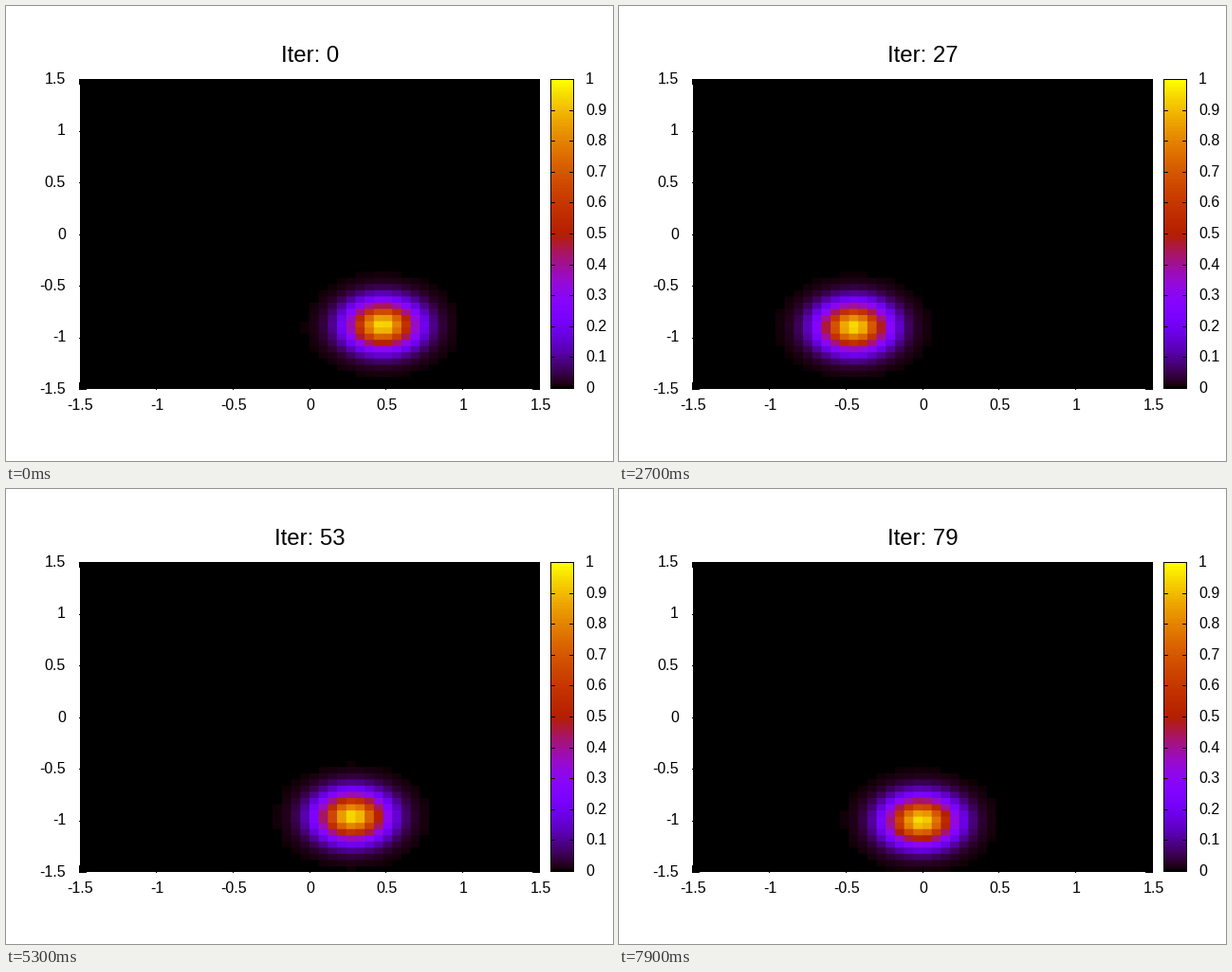
Animation, 640 px wide and 480 px high, one loop 8 s. Source, as a matplotlib script:

```python
import numpy as np
import matplotlib.pyplot as plt
from matplotlib.animation import FuncAnimation
from matplotlib.patches import Rectangle

W, H, DPI = 640, 480, 100
FRAMES, STEP = 80, 0.1
CELLS, SIGMA, CUTOFF = 50, 0.15, 0.00363
LEFT, RIGHT, TOP, BOTTOM = 78, 563, 77, 404      # heat map pixels
X0, X1, Y0, Y1 = 77.8, 562.2, 77.5, 404.5        # data range -1.5 .. 1.5

plt.rcParams["font.family"] = "Liberation Sans"


def palette(v):
    """Black-violet-red-yellow colour ramp."""
    v = np.clip(v, 0, 1)
    rgb = [np.sqrt(v), v ** 3, np.clip(np.sin(2 * np.pi * v), 0, 1)]
    return np.stack(rgb, axis=-1)


def swing(count):
    """Angles of a unit pendulum released at 0.5 rad, by RK4."""
    def slope(s):
        return np.array([s[1], -np.sin(s[0])])

    state, angles = np.array([0.5, 0.0]), []
    for _ in range(count):
        a = slope(state)
        b = slope(state + a * STEP / 2)
        c = slope(state + b * STEP / 2)
        d = slope(state + c * STEP)
        state = state + STEP / 6 * (a + 2 * b + 2 * c + d)
        angles.append(state[0])
    return angles


def coverage(first, last, lo, hi):
    """Share of every pixel that each cell covers along one axis."""
    edges = np.linspace(lo, hi, CELLS + 1)
    p = np.arange(first, last)[:, None]
    share = np.minimum(edges[1:], p + 1) - np.maximum(edges[:-1], p)
    return np.clip(share, 0, None)


COLS = coverage(LEFT, RIGHT, X0, X1)
ROWS = coverage(TOP, BOTTOM, Y0, Y1)
GRID = np.linspace(-1.5, 1.5, CELLS + 1)
ANGLES = swing(FRAMES)


def bump(centre):
    g = np.exp(-(GRID - centre) ** 2 / (2 * SIGMA ** 2))
    return (g[1:] + g[:-1]) / 2


def heat(n):
    x, y = np.sin(ANGLES[n]) - 0.0004, -np.cos(ANGLES[n])
    v = np.outer(bump(y)[::-1], bump(x))
    v[v < CUTOFF] = 0
    rgb = palette(v)
    img = [ROWS @ rgb[..., k] @ COLS.T for k in range(3)]
    return np.clip(np.stack(img, axis=-1), 0, 1)


fig = plt.figure(figsize=(W / DPI, H / DPI), dpi=DPI, facecolor="white")
ax = fig.add_axes([0, 0, 1, 1])


def box(x, y, w, h):
    ax.add_patch(Rectangle((x, y), w, h, fc="black", lw=0,
                           antialiased=False, zorder=3))


def label(x, y, text, px=16, ha="center"):
    return ax.text(x, y, text, fontsize=px * 72 / DPI, ha=ha,
                   va="baseline", color="black")


picture = ax.imshow(heat(0), extent=(LEFT, RIGHT, BOTTOM, TOP),
                    interpolation="nearest", zorder=1)

# axis ticks and labels
for t in np.arange(-1.5, 1.6, 0.5):
    x = 320 + t * 485 / 3
    y = 241 - t * 109
    px, py = int(x), int(min(y, 404))
    if t == -1.5:
        px = 77
    box(px, 397, 1, 8)
    box(px, 77, 1, 6)
    box(77, py, 8, 1)
    box(555, py, 8, 1)
    label(x + 1, 425.5, f"{t:g}")
    label(63, y + 4.5, f"{t:g}", ha="right")

# colour bar
ramp = palette(np.linspace(1, 0, 128))[:, None, :]
ax.imshow(ramp, extent=(575, 598, 404, 77), interpolation="nearest", zorder=1)
for x in (574, 598):
    box(x, 77, 1, 327)
for y in (77, 403):
    box(574, y, 25, 1)
for k in range(11):
    y = 403.5 - k * 32.6
    box(574, int(y), 5, 1)
    box(594, int(y), 5, 1)
    label(611, y + 4.5, f"{k / 10:g}", ha="left")

title = label(320.5, 59, "Iter: 0", px=24)

ax.set_xlim(0, W)
ax.set_ylim(H, 0)
ax.set_aspect("auto")
ax.axis("off")


def draw(n):
    picture.set_data(heat(n))
    title.set_text(f"Iter: {n}")
    return picture, title


anim = FuncAnimation(fig, draw, frames=FRAMES, interval=100,
                     repeat=True, repeat_delay=0, blit=False)
plt.show()
```
